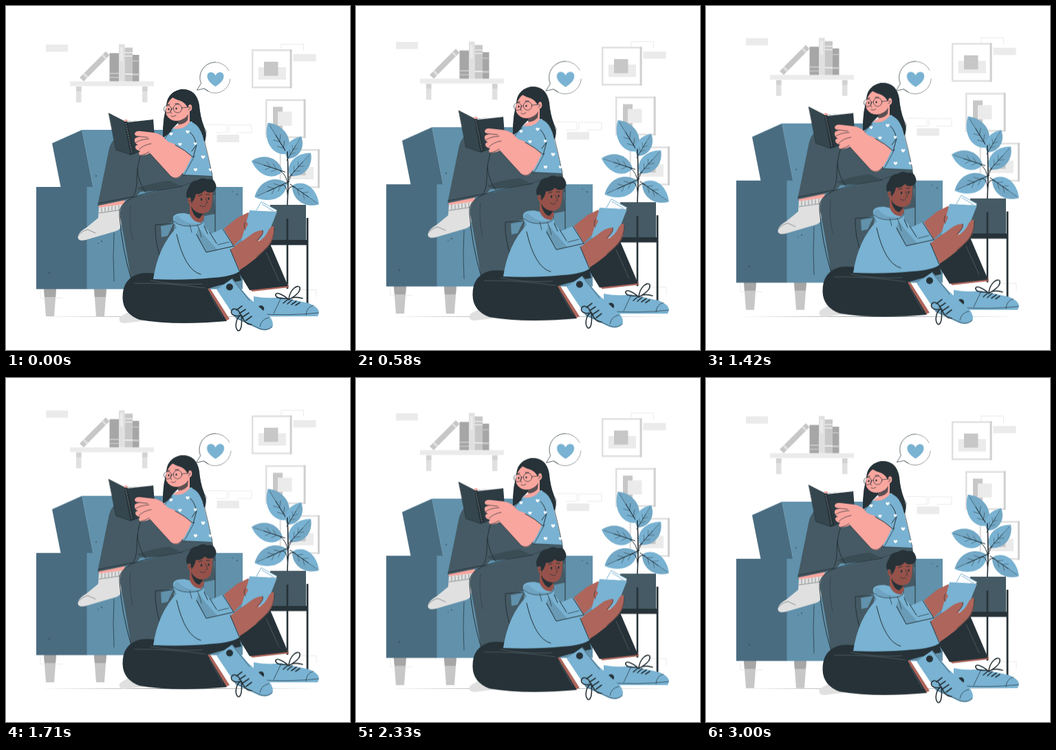
These frames come from a looping animation (500x500 px, 3040 ms). An HTML page:

```html
<!DOCTYPE html>
<html lang="en">
<head>
<meta charset="utf-8">
<title>Reading together</title>
<style>
  html, body { margin: 0; width: 100%; height: 100%; overflow: hidden; background: #fff; }
  svg { display: block; width: 500px; height: 500px; }
  .float { animation: float 3.04s linear infinite; }
  .pulse { animation: pulse calc(3.04s / 3) linear infinite; transform-origin: 303px 104px; }
  @keyframes float { 50% { transform: translateY(-10px); } }
  @keyframes pulse { 50% { transform: scale(1.07); } }

  .blue { fill: #79b2d2; }
  .sofa { fill: #6191ab; }
  .side { fill: #4a6c80; }
  .ink { fill: #263238; }
  .slate { fill: #455a64; }
  .pink { fill: #f9a69f; }
  .tan { fill: #ae655b; }
  .brown { fill: #96524a; }
  .pale { fill: #ebebeb; }
  .light { fill: #e0e0e0; }
  .mid { fill: #c7c7c7; }
  .gray { fill: #a6a6a6; }
  .white { fill: #fff; }
  .line { fill: none; stroke: #263238; stroke-width: 1; stroke-linecap: round; stroke-linejoin: round; }
  .thin { stroke-width: .7; }
  .hair { stroke-width: .45; }
  .bold { stroke-width: 1.6; }
  .seam { stroke: #59676d; }
  .brick { fill: none; stroke: #e6e6e6; stroke-width: .8; }
</style>
</head>
<body>
<svg viewBox="0 0 500 500">
  <defs>
    <path id="heart" d="M0 11C-8 6-12 1-12-4C-12-11-3-12 0-5C3-12 12-11 12-4C12 1 8 6 0 11Z"/>
    <g id="leaf">
      <path class="blue" d="M0 0C8-19 33-19 50 0C36 18 12 18 0 0Z"/>
      <path d="M0 0C12 18 36 18 50 0Z" fill="#263238" opacity=".08"/>
      <path class="line" d="M-4 0H30"/>
      <path class="line hair" d="M30 0H46M9 0L16-6M19 0L26-6M10 0L17 6M20 0L27 6"/>
    </g>
    <g id="frame">
      <path class="light" d="M0 0H58.500V56.500H0Z"/>
      <path d="M55.500 0H58.500V56.500H55.500Z" fill="#d0d0d0"/>
      <path class="white" d="M2.500 2.500H55.500V54H2.500Z"/>
    </g>
    <g id="bracket">
      <path class="light" d="M0 0H7.500V23H0Z"/>
      <path d="M0 0H7.500V7H0Z" fill="#d2d2d2"/>
    </g>
    <g id="foot">
      <path class="mid" d="M0 0H18L15 40H3Z"/>
      <path class="gray" d="M0 0H18L17 12H1Z"/>
    </g>
  </defs>

  <path class="ink" d="M48 451.200L250 450.900L451 451.200L250 451.600Z"/>

  <g class="float">
    <!-- wall -->
    <g>
      <path class="pale" d="M58 56H90V66.500H58ZM417.500 70H450.500V80.500H417.500ZM306.500 187H339V198H306.500Z"/>
      <path class="brick" d="M400 64V55.500H432.500V65M291 172.500H321V184H305M324 184V173H357V184H335M50 414V424.500H82M418 412.500H451V423"/>
      <path class="pale" d="M93 109.500H215V116.500H93Z"/>
      <use href="#bracket" x="102" y="117"/>
      <use href="#bracket" x="198" y="117"/>
      <path class="mid" d="M107 104L145 66L150.500 71.500L113 109.500Z"/>
      <path class="light" d="M111.500 99.500L114 97L119.500 102.500L117 105ZM139 72L141 70L146.500 75.500L144.500 77.500Z"/>
      <path class="gray" d="M150.500 68.500H164V109.500H150.500ZM184 71H193.500V109.500H184Z"/>
      <path class="light" d="M164 55.500H172.500V109.500H164Z"/>
      <path class="mid" d="M172.500 60.500H184V109.500H172.500ZM150.500 97H164V99H150.500ZM150.500 103H164V104.500H150.500ZM184 79H193.500V80.500H184ZM184 98H193.500V101H184Z"/>
      <path class="pale" d="M172.500 67H184V68.500H172.500ZM172.500 72H184V73.500H172.500ZM172.500 98H184V100H172.500ZM166 60H170V80H166Z"/>
      <use href="#frame" x="357" y="63"/>
      <path class="pale" d="M367 89H407V107H367Z"/>
      <path class="mid" d="M375 81H395.500V101.500H375Z"/>
      <use href="#frame" x="377" y="135.500"/>
      <path class="mid" d="M388 146.500H402V184H388Z"/>
      <path class="pale" d="M395 153.500H415.500V174H395Z"/>
      <use href="#frame" x="397.500" y="208"/>
      <path class="pale" d="M408 234H447V252H408Z"/>
      <path class="mid" d="M415 226H435.500V246H415Z"/>
    </g>

    <!-- sofa -->
    <g>
      <use href="#foot" x="55" y="411"/>
      <use href="#foot" x="128" y="411"/>
      <path class="sofa" d="M110 180H240V263H126Z"/>
      <path class="side" d="M67 199.500L110.500 180L126.500 263H79.500Z"/>
      <path class="sofa" d="M117 263H344V411.500H117Z"/>
      <path class="side" d="M44 263H117.500V411.500H44Z"/>
      <path d="M67 199.500L110.500 180L126.500 262.500" fill="none" stroke="#9cc3d8" stroke-width=".6" opacity=".6"/>
      <path class="line" d="M157 330Q155 365 157 400" opacity=".7"/>
      <g class="ink" opacity=".7">
        <circle cx="63" cy="388" r=".9"/><circle cx="131" cy="247" r=".9"/><circle cx="139" cy="342" r=".9"/>
        <circle cx="134" cy="345" r=".7"/><circle cx="336" cy="274" r=".9"/><circle cx="329" cy="270" r=".7"/>
      </g>
    </g>

    <!-- plant -->
    <g>
      <path class="ink" d="M407.700 309H410.300V411H407.700ZM436.700 308H439.500V434H436.700ZM380.500 341H383V380H380.500Z"/>
      <path class="slate" d="M384 289H436V341H384Z"/>
      <path class="ink" d="M407.700 309H410.300V341H407.700ZM381 340H439V347.500H381Z"/>
      <use href="#leaf" transform="translate(409 215) rotate(-122) scale(1.070)"/>
      <use href="#leaf" transform="translate(409.500 222) rotate(-59) scale(.76)"/>
      <use href="#leaf" transform="translate(402 240) rotate(-162) scale(.95)"/>
      <use href="#leaf" transform="translate(413 247) rotate(-48) scale(.9)"/>
      <use href="#leaf" transform="translate(408 257) rotate(156) scale(1.020)"/>
      <use href="#leaf" transform="translate(416 261) rotate(35) scale(.95)"/>
      <path class="line bold" d="M409 289Q411 250 409 212"/>
      <path class="line" d="M409.500 262Q409 246 398 239M409.500 262Q410 252 416 245M409.500 276Q408 256 399 261M409.500 274Q410 259 420 263"/>
    </g>

    <!-- woman -->
    <g>
      <path class="light" d="M165 453Q163 461 173 461L205 457L192 440Q172 446 165 453Z"/>
      <path class="light" d="M135 292L172 287L167 320Q166 326 157 328L116 340Q104 343 104.500 335Q106 328 117 322L134 308Z"/>
      <path class="pink" d="M134 288L173 281L172 288L135 293Z"/>
      <path class="line hair" d="M135 301L170 296M139 293V299M144 293V298.500M149 292V298M154 291V297M159 291V296.500M164 290V296M105 334Q110 327 119 325L130 330"/>
      <path class="slate" d="M133 290.500L150 207Q156 186 176 189L215 200L258 243L300 246L304 275L250 266L195 270L188 279Z"/>
      <path class="slate" d="M300 246L304 302L225 318L228 374L222 398H182Q176 360 167 312Q160 285 190 277Q220 269 253 262Z"/>
      <path class="slate" d="M216 318L245 317L238 370L226 374Z"/>
      <path d="M205 271Q235 264 253 261L238 254Q215 256 190 265Z" fill="#263238" opacity=".35"/>
      <path class="sofa" d="M225 320L243 317L235 334L226 336Z"/>
      <path class="line" d="M197 213Q190 230 190 258Q189 270 185 277L134 287M191 237Q192 255 203 271M256 262Q215 268 185 278Q162 288 165 305Q168 350 182 397M243 316L217 318Q216 345 227 373M304 268V330"/>
      <path class="line thin" d="M181 290Q178 310 184 340M258 246L299 247M253 262L281 253" opacity=".6"/>

      <path class="ink" d="M236 138Q227 160 228 192Q232 193 235 183L243 171L270 168Q274 178 285 187L288 198Q293 190 288 176Q282 160 281 144Q277 121 257 121Q240 123 236 138Z"/>
      <path class="line thin" d="M281 150Q283 171 291 182L289 197"/>
      <path class="blue" d="M229 191L246 175L268 168Q281 172 286 190Q294 220 300 247L257 245L262 228L247 210L231 207Z"/>
      <path class="ink" d="M232 158Q229 175 228 191Q237 187 243 177L252 168Z"/>
      <path class="pink" d="M250 160L267 151L267 169Q258 181 243 178L251 172Z"/>
      <path d="M251 166Q260 165 265 157L264 166Q258 173 250 172Z" fill="#263238" opacity=".75"/>
      <path class="pink" d="M235 139Q231 150 233 158Q238 167 248 167Q261 166 265 154Q272 152 270 145Q268 141 264 145L258 133L243 132Z"/>
      <path class="ink" d="M233 147Q233 126 254 121Q274 120 276 146L270 142Q266 141 264 148Q261 141 254 138Q247 136 242 133Q236 138 233 147Z"/>
      <g class="line thin">
        <circle cx="235" cy="150" r="5.500"/>
        <circle cx="249.500" cy="149" r="6.200"/>
        <path d="M240.500 149H243.300M255.700 148L266 147M240 150L239 155L241 156M240 160Q244 162 247 159M265 151Q268 150 268 147"/>
      </g>
      <path class="line" d="M234 144L238 143M246 142L251 142"/>
      <ellipse class="ink" cx="236.500" cy="150" rx="1.200" ry="1.600"/>
      <ellipse class="ink" cx="247.500" cy="149" rx="1.200" ry="1.600"/>

      <path d="M172 168L214 164L217 203L187 215L181 216Z" fill="#2d3b42"/>
      <path d="M149.500 156L172 167.500L181.500 216.500L160 209Z" fill="#35464e"/>
      <path class="ink" d="M172 168L176 167.500L187 214.500L181 216.500Z"/>
      <path class="white" d="M176 168L213 163L214 165L177 169Z"/>
      <path d="M174 170L183 213" fill="none" stroke="#e0e0e0" stroke-width=".5" stroke-dasharray="2 1.500"/>
      <path class="line thin" d="M149.500 156L172 167.500L181.500 216.500L160 209Z"/>
      <path class="pink" d="M171 167Q173 163 177 166L176 168Z"/>

      <path class="pink" d="M187 186Q188 181 196 182L214 184Q226 185 235 197L249 202L272 213Q262 239 253 248Q247 253 240 248L209 214Q202 218 195 217Q191 214 195 211Q188 209 188 205Q188 202 192 202Q186 199 187 194Q188 190 195 191Q188 190 187 186Z"/>
      <path class="line thin" d="M189 189L206 191M188 199Q194 194 208 193M193 209Q199 202 211 200M196 217Q202 216 208 212M209 214L240 248Q249 254 257 243"/>
      <path class="blue" d="M247 188L266 178L278 200L272 220Q260 209 246 202Z"/>
      <path class="line" d="M246 202Q260 209 272 220L277 202M268 184Q273 188 276 198M276 203L270 211"/>
      <path class="line thin" d="M231 193Q236 184 242 181M274 218L261 242L258 246M287 190Q294 218 300 246"/>
      <g class="white">
        <use href="#heart" transform="translate(240 186) scale(.2)"/>
        <use href="#heart" transform="translate(264 183) scale(.23)"/>
        <use href="#heart" transform="translate(253 201) scale(.21)"/>
        <use href="#heart" transform="translate(275 200) scale(.19)"/>
        <use href="#heart" transform="translate(286.500 219.500) scale(.24)"/>
        <use href="#heart" transform="translate(275.500 238) scale(.23)"/>
        <use href="#heart" transform="translate(297 238) scale(.2)"/>
      </g>
    </g>

    <!-- man -->
    <g>
      <path class="tan" d="M353 411L410 404L411 409L358 415Z"/>
      <path class="ink" d="M335 382L384 346L410 407L354 413Z"/>
      <path class="line thin seam" d="M378 358L397 400"/>
      <path class="tan" d="M291 410L297 411L325 455L318 458Z"/>
      <path class="ink" d="M169.500 424Q169 396 194 389Q214 385 242 396L339 386L342 399L310 406L293 411L321 458Q245 465 194 456Q170 447 169.500 424Z"/>
      <path class="line thin seam" d="M187 403Q235 402 290 410M210 399Q245 406 285 404M296 418L315 452"/>

      <path class="blue" d="M360 422Q382 426 399 423L440 432Q455 438 455 446L453 451L360 451Z"/>
      <path class="line thin" d="M362 447Q410 451 454 446M436 449Q437 437 447 435M400 424L389 447"/>
      <circle class="ink" cx="370.500" cy="440" r="4.700"/>
      <path class="line bold" d="M403 432L410 426M409 433L416 427M415 434L422 429M421 435L427 431M409 425C387 427 390 415 397 418Q405 421 411 427C412 412 424 404 427 409C429 416 419 422 411 427Q418 421 431 425"/>
      <path class="blue" d="M306 412L329 396L352 423L384 452Q390 461 387 467Q379 474 368 470L334 454Z"/>
      <path class="line thin" d="M334 453L369 469Q380 473 387 466M369 466Q371 455 382 453M329 397L354 428"/>
      <circle class="ink" cx="325" cy="408.500" r="5"/>
      <path class="line bold" d="M335 442L343 436M339 447L348 441M344 452L353 446M349 457L357 451M341 448C335 436 325 440 328 447Q333 453 342 449C334 453 332 467 337 472C343 473 343 459 342 449Q348 464 357 463"/>

      <path class="tan" d="M315 325L336 308L352 300L358 307L350 330L330 349Z"/>
      <path class="blue" d="M354 297L394 299L379 337Q362 344 342 341Z"/>
      <path class="white" d="M364 297L371 284.500L394 297L392 299Z"/>
      <path d="M364 297L371 284.500L394 297M372 288L389 298" fill="none" stroke="#79b2d2"/>
      <path class="tan" d="M345 316Q350 312 352 317L347 326Q343 322 345 316Z"/>
      <path class="line thin" d="M348 314Q344 320 348 325"/>
      <path class="tan" d="M325 354L350 337Q364 325 373 326Q376 329 370 336L366 342Q376 339 382 325Q388 317 390 322Q391 339 381 350Q363 369 338 385Z"/>
      <path class="line thin" d="M373 326Q376 330 365 341M390 322Q390 338 381 349Q374 357 365 364"/>

      <path class="blue" d="M244 314Q238 301 259 301L280 306Q289 309 288 320L298 331L316 323L332 350L326 354L340 385Q330 393 300 395Q260 399 214 397Q221 350 248 322Z"/>
      <path d="M276 333L291 358L307 354L290 335L280 322Z" fill="#263238" opacity=".18"/>
      <path d="M244 312Q254 322 276 319Q288 317 287 309L281 316Q262 319 250 305Q244 305 244 312Z" fill="#263238" opacity=".12"/>
      <path class="line" d="M277 332L291 358L331 349M248 332Q260 384 283 390M296 329L306 345M315 324L331 349M326 354L339 385M293 331L288 320"/>
      <path class="line thin" d="M244 313Q255 323 277 319Q289 317 287 309M278 318Q282 326 284 336M267 318L270 329M308 347L324 343"/>
      <path class="brown" d="M267 288L267 303Q272 315 284 315L288 308L286 298Z"/>
      <path class="ink" d="M269 291Q275 302 287 302L281 309Q272 307 269 291Z"/>
      <path class="brown" d="M270 273L300 265Q301 286 297 295Q293 302 284 301Q275 300 271 290Q264 289 264 281Q265 277 270 280Z"/>
      <path class="ink" d="M263 279Q260 271 266 263Q268 254 279 253Q285 248 293 252Q301 250 304 257Q308 265 302 270Q293 273 289 268Q283 275 276 273Q275 280 270 286L268 278Z"/>
      <path class="line thin" d="M290 279L293 286L290 288M282 290Q286 293 290 291M266 283Q269 281 270 286"/>
      <path class="line" d="M280 276L285 274M291 274L296 274"/>
      <ellipse class="ink" cx="284" cy="281" rx="1.300" ry="2"/>
      <ellipse class="ink" cx="294.500" cy="280" rx="1.200" ry="2"/>
    </g>
  </g>

  <g class="pulse">
    <path class="white" d="M288 120L277.500 122.300L283.500 112.500A22.300 22.300 0 1 1 288 120Z"/>
    <path class="line hair" d="M326 106A22.300 22.300 0 0 1 288 120M304 81.700A22.300 22.300 0 0 1 324 94"/>
    <path class="line thin" d="M294 123.500L288 120L277.500 122.300L283.500 112.500A22.300 22.300 0 0 1 304 81.700"/>
    <use href="#heart" class="blue" x="304.500" y="106"/>
  </g>
</svg>
</body>
</html>
```
